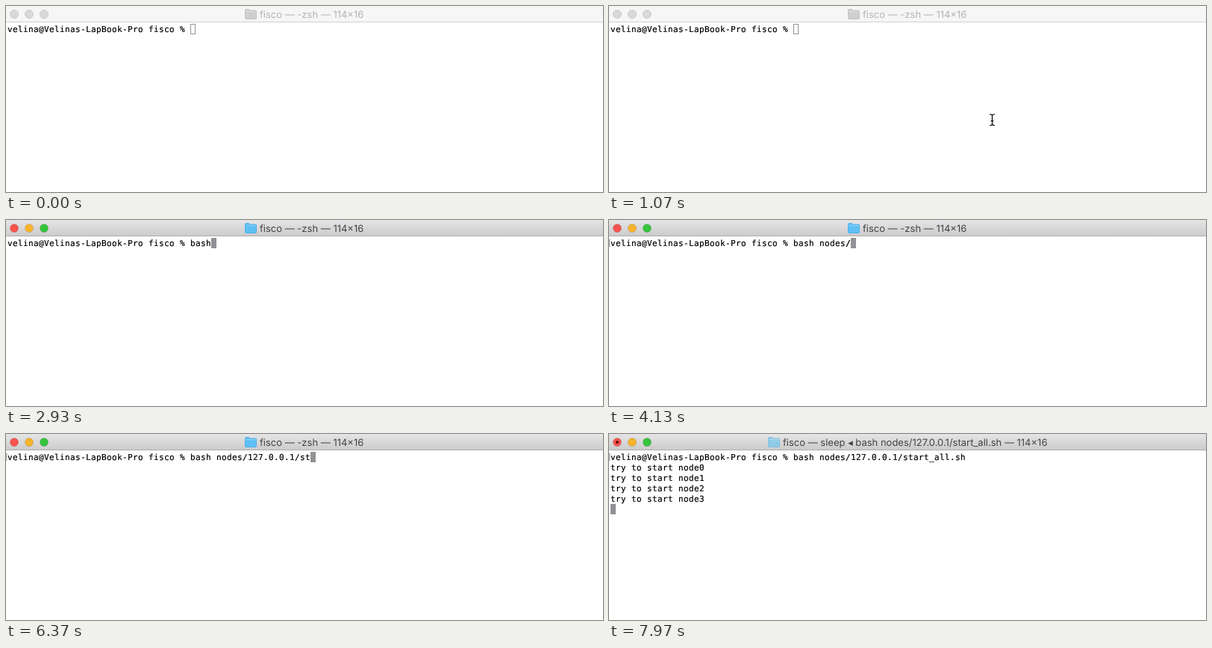
An HTML page for the animation above (8000 ms loop, 800x250 px).

```html
<!DOCTYPE html>
<html lang="en">
<head>
<meta charset="utf-8">
<title>Terminal</title>
<style>
  html, body { margin: 0; width: 100%; height: 100%; overflow: hidden; background: #fff; }
  svg { display: block; width: 800px; height: 250px; }
  text { white-space: pre; text-rendering: geometricPrecision; }
  #title { font: 13px Inter, "DejaVu Sans", sans-serif; fill: #434343; }
  /* Each glyph sits in a 7px terminal cell. */
  #screen {
    font: 11px "DejaVu Sans Mono", monospace;
    letter-spacing: calc(7px - .602em);
    fill: #000; stroke: #000; stroke-width: .2px;
  }
  #slash { font-weight: bold; }
  #caret { fill: #929196; stroke: #929196; }
  #buttons circle { stroke: #0002; }
  .inactive #bar { fill: #f6f6f6; }
  .inactive #edge { fill: #d1d1d1; }
  .inactive #title { fill: #b3b3b3; }
  .inactive #buttons circle { fill: #d9d9d9; stroke: #cacaca; }
  .inactive #folder { fill: #cfcfcf; stroke: #c2c2c2; }
  .inactive #caret { fill: none; stroke: #949494; }
</style>
</head>
<body>
<svg id="window" viewBox="0 0 800 250">
  <defs>
    <linearGradient id="metal" x2="0" y2="1">
      <stop stop-color="#e6e5e6"/>
      <stop offset="1" stop-color="#cdcccd"/>
    </linearGradient>
  </defs>
  <rect width="800" height="250" fill="#fff"/>
  <rect id="bar" width="800" height="21" fill="url(#metal)"/>
  <rect id="edge" y="21" width="800" height="1" fill="#aeadae"/>
  <g id="buttons">
    <circle cx="11" cy="11" r="5.5" fill="#f7544e"/>
    <circle cx="31" cy="11" r="5.5" fill="#f8b42c"/>
    <circle cx="51" cy="11" r="5.5" fill="#35c43c"/>
  </g>
  <circle id="busyDot" cx="11" cy="11" r="2" fill="#5c0b08"/>
  <g id="heading">
    <path id="folder" d="M.5 5.5q0-1 1-1h4l1.500 1.500h7.500q1 0 1 1v9.500q0 1-1 1h-13q-1 0-1-1z"/>
    <path d="M1 7.500h14" stroke="#fff" stroke-opacity=".3"/>
    <text id="title" x="20" y="16"></text>
  </g>
  <path id="mark" d="M2 26.500H.5V35.500H1.500" fill="none" stroke="#999"/>
  <g id="screen">
    <text x="2" y="35"><tspan id="command"></tspan><tspan id="slash"></tspan></text>
    <text x="2" y="49"></text>
    <text x="2" y="63"></text>
    <text x="2" y="77"></text>
    <text x="2" y="91"></text>
  </g>
  <rect id="caret" x=".5" y=".5" width="6" height="13"/>
  <g id="pointer" fill="none" stroke-linecap="round">
    <path id="beam" d="M-3-7.500Q0-7.500 0-5.500Q0-7.500 3-7.500M0-5.500V5.500M-3 7.500Q0 7.500 0 5.500Q0 7.500 3 7.500M-1.500 1.500H1.500"
          stroke="#000" stroke-width="1.200"/>
  </g>
</svg>
<script>
const LOOP = 8000;
const ACTIVATE = 1300, FIRST_KEY = 1830, MARKED = 3930, ENTER = 7530, BUSY = 7800;
const PROMPT = 'velina@Velinas-LapBook-Pro fisco % ';
const SCRIPT = 'bash nodes/127.0.0.1/start_all.sh';

// [time, characters of SCRIPT on the command line]; larger jumps are tab completions
const TYPING = [
  [FIRST_KEY, 1], [2030, 2], [2400, 3], [2600, 4], [3030, 5], [3630, 6], [3700, 7],
  [MARKED, 11], [4730, 12], [4970, 21], [6030, 22], [6370, 23], [6530, 24], [6970, 33]
];
const OUTPUT = [7670, 7700, 7730, 7770];

const $ = id => document.getElementById(id);
const lines = [...document.querySelectorAll('#screen > text')].slice(1);
const show = (id, on) => $(id).setAttribute('visibility', on ? 'visible' : 'hidden');
const place = (id, x, y) => $(id).setAttribute('transform', `translate(${x} ${y})`);
const countPast = (times, t) => times.filter(time => t >= time).length;

function drawHeading(t) {
  const busy = t >= BUSY;
  $('window').classList.toggle('inactive', t < ACTIVATE);
  $('title').textContent = busy
    ? 'fisco — sleep ◂ bash nodes/127.0.0.1/start_all.sh — 114×16'
    : 'fisco — -zsh — 114×16';
  $('folder').setAttribute('fill', busy ? '#8fcbe6' : '#5fc0f4');
  $('folder').setAttribute('stroke', busy ? '#83bfdc' : '#4db0e6');
  place('heading', busy ? 213 : 320, 0);
  show('busyDot', busy);
}

function drawScreen(t) {
  const keys = countPast(TYPING.map(key => key[0]), t);
  const typed = SCRIPT.slice(0, keys ? TYPING[keys - 1][1] : 0);
  const endsInSlash = typed.endsWith('/');
  $('command').textContent = PROMPT + (endsInSlash ? typed.slice(0, -1) : typed);
  $('slash').textContent = endsInSlash ? '/' : '';
  show('mark', t >= MARKED);

  const printed = countPast(OUTPUT, t);
  lines.forEach((line, i) => line.textContent = i < printed ? `try to start node${i}` : '');

  if (t >= ENTER) {
    place('caret', 2, 38 + 14 * printed);
  } else {
    // A finished completion is followed by a space.
    const column = PROMPT.length + typed.length + (typed === SCRIPT ? 1 : 0);
    place('caret', 2 + 7 * column, 24);
  }
}

function drawPointer(t) {
  show('pointer', t >= 630 && t < FIRST_KEY);
  const p = Math.min(1, Math.max(0, Math.floor((t - 630) / 35) / 4));
  const rest = (1 - p) ** 2;
  if (t < 1030) place('pointer', 516.5 + 29 * rest, 161.5 + 69 * rest);
  else place('pointer', 513.5, 153);
}

function frame() {
  const t = performance.now() % LOOP;
  drawHeading(t);
  drawScreen(t);
  drawPointer(t);
  requestAnimationFrame(frame);
}
frame();
</script>
</body>
</html>
```
